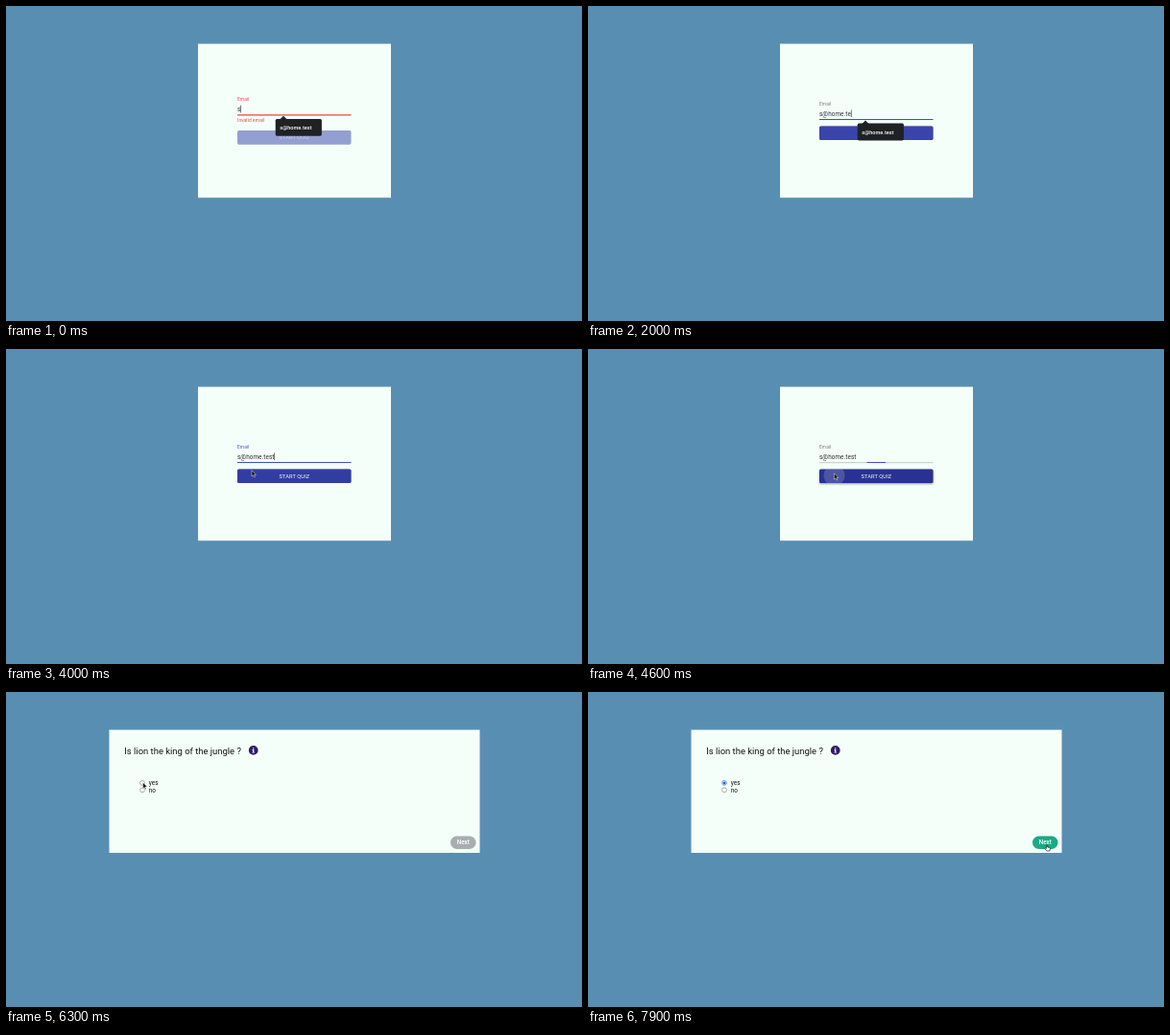
These frames come from a looping animation (600x329 px, 8 s). An HTML page:

```html
<!DOCTYPE html>
<html lang="en">
<head>
<meta charset="utf-8">
<title>Quiz sign-in</title>
<style>
  html, body { margin: 0; width: 100%; height: 100%; overflow: hidden; background: #598eb3; }
  svg { display: block; width: 100%; height: 100%; }
  text { font-family: Roboto, Arial, sans-serif; white-space: pre; }
  .small { font-size: 4.8px; letter-spacing: .13px; }
  .input { font-size: 6.4px; letter-spacing: .06px; }
</style>
</head>
<body>
<svg viewBox="0 0 600 329" preserveAspectRatio="none">
  <defs>
    <clipPath id="buttonClip"><rect x="241" y="125.4" width="118.5" height="14.6" rx="1.6"/></clipPath>
  </defs>
  <rect width="600" height="329" fill="#598eb3"/>

  <g id="login">
    <rect x="200" y="39.5" width="201" height="160.7" fill="#f5fffa"/>
    <g id="field">
      <text id="label" class="small" x="241" y="104.1">Email</text>
      <text id="input" class="input" x="241" y="114.9" fill="#333"></text>
      <rect id="caret" y="108.4" width=".6" height="7.8" fill="#222"/>
      <rect x="241" y="118.6" width="118.5" height=".5" fill="#8d9390"/>
      <rect id="line" y="118" height="1" />
    </g>
    <text id="error" class="small" x="241" y="121" fill="#f44336">Invalid email</text>
    <g id="button">
      <rect id="face" x="241" y="125.4" width="118.5" height="14.6" rx="1.6"/>
      <circle id="ripple" cx="256.5" cy="132" fill="#fff" fill-opacity=".17" clip-path="url(#buttonClip)"/>
      <text id="start" x="300.4" y="134.8" text-anchor="middle" font-size="5.6" letter-spacing=".16">START QUIZ</text>
    </g>
    <g id="tip">
      <path d="M285.5 123 L289 119.4 L292.5 123 Z" fill="#202124"/>
      <rect x="280.7" y="122.6" width="48.2" height="17.8" rx="1.6" fill="#202124"/>
      <text x="285.3" y="133.6" font-size="5.6" font-weight="500" fill="#fff">s@home.test</text>
    </g>
  </g>

  <g id="quiz">
    <rect x="107.5" y="39.5" width="386" height="128.5" fill="#f5fffa"/>
    <text x="123.3" y="64.5" font-size="9.45" fill="#111">Is lion the king of the jungle ?</text>
    <circle cx="257.7" cy="60.9" r="4.9" fill="#311b6b"/>
    <path d="M257.1 58.2h1.2v1.2h-1.2z M256.6 60.1h1.7v2.6h.6v.8h-2.4v-.8h.6v-1.8h-.5z" fill="#fff"/>
    <circle id="yesRing" cx="142" cy="94.9" r="2.4" fill="#fff" stroke-width=".6"/>
    <circle id="yesDot" cx="142" cy="94.9" r="1.5" fill="#1a66e0"/>
    <circle cx="142" cy="102.4" r="2.4" fill="#fff" stroke="#767676" stroke-width=".6"/>
    <text x="148.8" y="97" font-size="6.4" fill="#111">yes</text>
    <text x="148.8" y="104.7" font-size="6.4" fill="#111">no</text>
    <rect id="next" x="463" y="150.6" width="26.5" height="13.4" rx="6.7"/>
    <text x="476.3" y="159.2" text-anchor="middle" font-size="6.3" font-weight="500" fill="#fff">Next</text>
  </g>

  <path id="beam" d="M-1.5 -3.5 Q0 -3.5 0 -2.6 Q0 -3.5 1.5 -3.5 M0 -2.6 V2.6 M-1.5 3.5 Q0 3.5 0 2.6 Q0 3.5 1.5 3.5" fill="none" stroke="#222" stroke-width=".7"/>
  <path id="arrow" d="M0 0 V6.4 L1.5 5.1 L2.5 7.3 L3.5 6.8 L2.5 4.7 H4.5 Z" fill="#111" stroke="#fff" stroke-width=".45"/>
  <path id="hand" d="M-.6 .5 Q0 -.4 .6 .5 V2.6 L2.9 3.2 Q3.6 3.5 3.4 4.3 L2.8 6.6 H-.3 L-2 4.2 Q-1.8 3.3 -.6 4 Z" fill="#fff" stroke="#111" stroke-width=".65"/>
</svg>
<script>
const LOOP = 8000;
const EMAIL = "s@home.test";
const KEYS = [-200, 600, 900, 1200, 1300, 1400, 1500, 1800, 2000, 2100, 3000];
const VALID = 2000, TIP_OFF = 3000, HOVER = 3900, PRESS = 4500, QUIZ = 4700, CHECK = 6700;
const SHIFT = 4.7;

// Cursor stops: time, x, y
const STOPS = [
  [3200, 254, 112], [3450, 254, 112], [4200, 256.4, 129.8],
  [5250, 256.4, 129.8], [6000, 142.6, 94.4],
  [6700, 142.6, 94.4], [7500, 543, 156.5], [7900, 478, 159.4]
];
const RED = [244, 67, 54], BLUE = [63, 81, 191], GREY = [117, 122, 120];
const FACE = [57, 69, 172], DARK = [40, 50, 146];

const el = {};
document.querySelectorAll("svg [id]").forEach(n => el[n.id] = n);

const set = (n, attrs) => { for (const k in attrs) n.setAttribute(k, attrs[k]); };
const show = (n, on) => n.setAttribute("visibility", on ? "inherit" : "hidden");
const ramp = (t, from, to) => Math.min(1, Math.max(0, (t - from) / (to - from)));
const smooth = p => p * p * (3 - 2 * p);
const easeOut = p => 1 - Math.pow(1 - p, 2.6);
const mix = (a, b, p) => `rgb(${a.map((v, i) => Math.round(v + (b[i] - v) * p))})`;

function cursorAt(t) {
  let i = 0;
  while (i < STOPS.length - 2 && t >= STOPS[i + 1][0]) i++;
  const [t0, x0, y0] = STOPS[i], [t1, x1, y1] = STOPS[i + 1];
  const p = smooth(ramp(t, t0, t1));
  return [x0 + (x1 - x0) * p, y0 + (y1 - y0) * p];
}

function drawLogin(t) {
  const valid = t >= VALID, pressed = t >= PRESS;
  const shift = valid ? 0 : SHIFT;
  set(el.field, { transform: `translate(0 ${-shift})` });
  set(el.tip, { transform: `translate(0 ${-shift})` });
  set(el.button, { transform: `translate(0 ${shift})` });
  show(el.error, !valid);
  show(el.tip, t < TIP_OFF);

  const typed = KEYS.filter(k => t >= k);
  el.input.textContent = EMAIL.slice(0, typed.length);
  const idle = t - typed[typed.length - 1];
  show(el.caret, !pressed && idle % 1000 < 500);
  set(el.caret, { x: 241 + el.input.getComputedTextLength() });

  const toBlue = ramp(t, VALID - 100, VALID + 150);
  set(el.label, {
    fill: pressed ? mix(BLUE, GREY, ramp(t, PRESS, PRESS + 100))
      : valid ? mix(GREY, BLUE, ramp(t, VALID, VALID + 200)) : mix(RED, RED, 0)
  });
  const width = 118.5 * (1 - easeOut(ramp(t, PRESS, PRESS + 200)));
  set(el.line, { x: 300.25 - width / 2, width, fill: valid ? mix(BLUE, BLUE, toBlue) : mix(RED, RED, 0) });

  const hover = ramp(t, HOVER, HOVER + 250), press = ramp(t, PRESS, PRESS + 150);
  set(el.face, { fill: valid ? mix(FACE, DARK, hover) : "#949fd1" });
  el.face.style.filter = valid
    ? `drop-shadow(0 ${.6 + .4 * hover + .6 * press}px ${.5 + .4 * hover + .5 * press}px rgba(0,0,0,.4))` : "none";
  set(el.start, { fill: valid ? "#fff" : "#c5cbe8" });
  set(el.ripple, { r: pressed ? 11 * (t - PRESS) / 100 : 0 });
}

function drawQuiz(t) {
  const checked = t >= CHECK;
  set(el.yesRing, { stroke: checked ? "#1a66e0" : "#767676" });
  show(el.yesDot, checked);
  set(el.next, { fill: checked ? "#1aaa86" : "#a9adaf" });
}

function drawCursor(t) {
  const [x, y] = cursorAt(t);
  const on = t >= STOPS[0][0];
  const beam = t < QUIZ && y < 119;
  const hand = t > CHECK && x > 463 && x < 489.5 && y > 150.6;
  const kinds = { beam, hand, arrow: !beam && !hand };
  for (const k in kinds) {
    show(el[k], on && kinds[k]);
    set(el[k], { transform: `translate(${x} ${y})` });
  }
}

function draw(t) {
  const quiz = t >= QUIZ;
  show(el.login, !quiz);
  show(el.quiz, quiz);
  if (quiz) drawQuiz(t); else drawLogin(t);
  drawCursor(t);
}

let begin;
function tick(now) {
  begin ??= now;
  draw((now - begin) % LOOP);
  requestAnimationFrame(tick);
}
draw(0);
requestAnimationFrame(tick);
</script>
</body>
</html>
```
